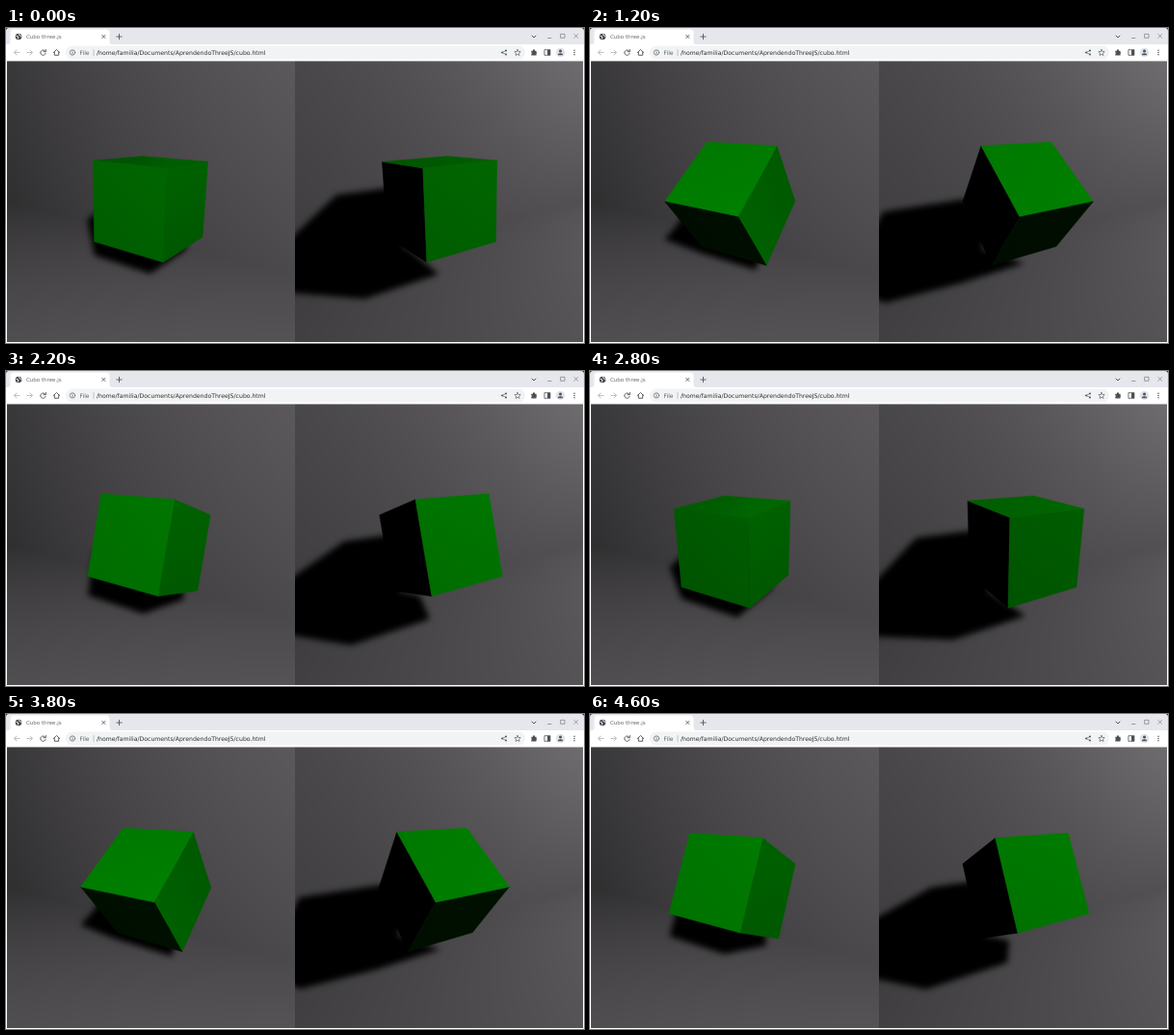
Write an HTML page with a canvas that moves like this. It is 600 px wide and 328 px high and loops after 4700 ms.

```html
<!DOCTYPE html>
<html lang="pt">
<head>
<meta charset="utf-8">
<title>Cubo three.js</title>
<style>
  html, body { margin: 0; width: 600px; height: 328px; overflow: hidden; background: #fff; }
  canvas, svg { position: absolute; left: 0; top: 0; display: block; }
  text { font-family: "DejaVu Sans", sans-serif; }
</style>
</head>
<body>
<canvas id="stage" width="600" height="328"></canvas>
<svg width="600" height="328" viewBox="0 0 600 328" fill="none" stroke-linecap="round" stroke-linejoin="round">
  <path d="M0 0H600V17H0Z" fill="#e6e7ed"/>
  <path d="M0 0H3Q0 0 0 3ZM600 0H597Q600 0 600 3Z" fill="#222"/>
  <path d="M0 17H2Q4.500 17 4.500 14V5Q4.500 1.500 8 1.500H104Q107.500 1.500 107.500 5V14Q107.500 17 110 17H600V34.500H0Z" fill="#fff"/>
  <circle cx="13" cy="9" r="3.300" fill="#4b4f54"/>
  <path d="M10.800 8.200L12.600 9L12.300 11M13.500 6.500L14.500 8L15.500 8.300" stroke="#fff" stroke-width=".9"/>
  <text x="21" y="11.200" font-size="5.500" fill="#686c70">Cubo three.js</text>
  <path d="M99.800 7.300L103 10.500M103 7.300L99.800 10.500M114.800 9H120.200M117.500 6.300V11.700" stroke="#44474b" stroke-width=".8"/>
  <path d="M546 8L548 10L550 8" stroke="#44474b" stroke-width=".9"/>
  <path d="M562.500 10.500H566M576 6.300H580V10.300H576ZM589.800 6.500L593.600 10.300M593.600 6.500L589.800 10.300" stroke="#85888c" stroke-width=".8"/>
  <path d="M14 25.500H8.500M11 23L8.500 25.500L11 28M22 25.500H27.500M25 23L27.500 25.500L25 28" stroke="#b6b8bb" stroke-width=".9"/>
  <g stroke="#4d5156" stroke-width=".9">
    <path d="M40.800 24.200A2.700 2.700 0 1 0 41.100 26.500M41.300 22.500V24.700H39"/>
    <path d="M49.300 25.500L52.500 22.500L55.700 25.500M50.300 25V28.300H54.700V25"/>
  </g>
  <rect x="62" y="18.500" width="477" height="14" rx="7" fill="#f1f3f4"/>
  <circle cx="69" cy="25.500" r="2.700" stroke="#5f6368" stroke-width=".7"/>
  <path d="M69 25.300V27M69 24V24.100" stroke="#5f6368" stroke-width=".7"/>
  <text x="76.500" y="27.600" font-size="6" fill="#5f6368">File</text>
  <path d="M91 22.500V28.500" stroke="#a2a5a9" stroke-width=".6"/>
  <text x="94" y="27.600" font-size="6.170" fill="#2c2e31">/home/familia/Documents/AprendendoThreeJS/cubo.html</text>
  <g stroke="#5f6368" stroke-width=".7">
    <path d="M519 23.500L515 25.500L519 27.500"/>
    <path d="M531 22.400L531.900 24.500L534.200 24.700L532.500 26.200L533 28.500L531 27.300L529 28.500L529.500 26.200L527.800 24.700L530.100 24.500Z"/>
  </g>
  <g fill="#4d5156">
    <circle cx="519" cy="23.500" r=".9"/><circle cx="515" cy="25.500" r=".9"/><circle cx="519" cy="27.500" r=".9"/>
    <path d="M545.300 23.700H547V22.800Q548 21.500 549 22.800V23.700H550.500V25.200Q552 26 550.500 27V28.500H545.300V27Q546.600 26 545.300 25.200Z"/>
    <path d="M562 22.700H565V28.300H562Z"/>
    <circle cx="590" cy="23.200" r=".75"/><circle cx="590" cy="25.500" r=".75"/><circle cx="590" cy="27.800" r=".75"/>
  </g>
  <rect x="559.300" y="22.700" width="5.600" height="5.600" stroke="#4d5156" stroke-width=".8"/>
  <circle cx="575.500" cy="25.500" r="4.700" fill="#dfe3ea"/>
  <circle cx="575.500" cy="24.100" r="1.500" fill="#4d5156"/>
  <path d="M572.600 28.300Q572.800 26.300 575.500 26.300T578.400 28.300Z" fill="#4d5156"/>
</svg>
<script>
const LOOP = 4700, STEP = 100;
const FOCAL = 312, MID_Y = 180.5;
const LEFT = 1, RIGHT = 599, TOP = 34, BOTTOM = 327;
const CAMERA = [4, 2, 6], LIGHT = [10, 10, 10];
const FLOOR = -2, WALL = -2;
const START = -3, DEG_PER_SEC = 34.4;
const SHADOW_SCALE = 0.92, SHADOW_BLUR = 3;

const dot = (a, b) => a[0] * b[0] + a[1] * b[1] + a[2] * b[2];
const sub = (a, b) => a.map((v, i) => v - b[i]);
const unit = a => a.map(v => v / Math.hypot(...a));
const cross = (a, b) => [a[1] * b[2] - a[2] * b[1], a[2] * b[0] - a[0] * b[2], a[0] * b[1] - a[1] * b[0]];
const lambert = (p, n) => Math.max(0, dot(n, unit(sub(LIGHT, p))));

const back = unit(CAMERA), right = unit(cross([0, 1, 0], back)), up = cross(back, right);
const DIST = Math.hypot(...CAMERA);

// side is 1 for the left view and -1 for the mirrored camera on the right
const mirror = (p, side) => [p[0] * side, p[1], p[2]];

function project(p, side) {
  const q = mirror(p, side), k = FOCAL / (DIST - dot(q, back));
  return [300 - side * (149 - k * dot(q, right)), MID_Y - k * dot(q, up)];
}

const ctx = document.getElementById("stage").getContext("2d");

function makeCanvas() {
  const c = document.createElement("canvas");
  c.width = 600;
  c.height = 328;
  return c;
}
const room = makeCanvas(), shade = makeCanvas();

function paintRoom() {
  const g = room.getContext("2d"), img = g.createImageData(600, 328);
  for (let y = TOP; y < BOTTOM; y++) {
    for (let x = LEFT; x < RIGHT; x++) {
      const side = x < 300 ? 1 : -1;
      const sx = (149 - side * (300 - x - 0.5)) / FOCAL, sy = (MID_Y - y - 0.5) / FOCAL;
      const eye = mirror(CAMERA, side);
      const ray = mirror(right.map((r, i) => r * sx + up[i] * sy - back[i]), side);
      const toWall = ray[2] < 0 ? (WALL - eye[2]) / ray[2] : Infinity;
      const toFloor = ray[1] < 0 ? (FLOOR - eye[1]) / ray[1] : Infinity;
      const t = Math.min(toWall, toFloor);
      const hit = eye.map((v, i) => v + ray[i] * t);
      const v = 126 * lambert(hit, toWall < toFloor ? [0, 0, 1] : [0, 1, 0]) ** 1.25;
      img.data.set([v, v * 0.975, v * 1.005, 255], (y * 600 + x) * 4);
    }
  }
  g.putImageData(img, 0, 0);
}

function trace(g, points) {
  g.beginPath();
  points.forEach(([x, y]) => g.lineTo(x, y));
  g.closePath();
}

function cubeFaces(angle) {
  const c = Math.cos(angle), s = Math.sin(angle);
  const turn = ([x, y, z]) => [x, y * c - z * s, y * s + z * c];
  const faces = [];
  for (let axis = 0; axis < 3; axis++) {
    for (const sign of [-1, 1]) {
      const corner = (a, b) => {
        const p = [0, 0, 0];
        p[axis] = sign;
        p[(axis + 1) % 3] = a;
        p[(axis + 2) % 3] = b;
        return turn(p);
      };
      const n = [0, 0, 0];
      n[axis] = sign;
      faces.push({ normal: turn(n), points: [corner(-1, -1), corner(1, -1), corner(1, 1), corner(-1, 1)] });
    }
  }
  return faces;
}

// Casts a point of the slightly shrunken cube away from the light onto a plane
function cast(point, axis, level) {
  const p = point.map(v => v * SHADOW_SCALE);
  const k = (p[axis] - level) / (LIGHT[axis] - p[axis]);
  return p.map((v, i) => v + (v - LIGHT[i]) * k);
}

function drawShadow(faces, side) {
  const g = shade.getContext("2d");
  g.clearRect(0, 0, 600, 328);
  const a = project([-12 * side, FLOOR, WALL], side), b = project([5 * side, FLOOR, WALL], side);
  for (const [axis, level, edge, overlap] of [[2, WALL, -100, 0.7], [1, FLOOR, 428, -0.7]]) {
    g.save();
    trace(g, [[a[0], a[1] + overlap], [b[0], b[1] + overlap], [b[0], edge], [a[0], edge]]);
    g.clip();
    for (const f of faces) {
      trace(g, f.points.map(p => project(cast(p, axis, level), side)));
      g.fill();
    }
    g.restore();
  }
  ctx.filter = `blur(${SHADOW_BLUR}px)`;
  ctx.drawImage(shade, 0, 0);
  ctx.filter = "none";
}

function drawCube(faces, side) {
  const eye = mirror(CAMERA, side);
  for (const { normal, points } of faces) {
    if (dot(normal, eye) <= 1) continue;
    const flat = points.map(p => project(p, side));
    const light = points.map(p => lambert(p, normal));
    const lo = light.indexOf(Math.min(...light)), hi = light.indexOf(Math.max(...light));
    const green = i => `rgb(0,${Math.round(148 * light[i] ** 0.75)},0)`;
    let paint = green(lo);
    if (lo !== hi) {
      paint = ctx.createLinearGradient(...flat[lo], ...flat[hi]);
      paint.addColorStop(0, green(lo));
      paint.addColorStop(1, green(hi));
    }
    ctx.fillStyle = ctx.strokeStyle = paint;
    ctx.lineWidth = 0.5;
    trace(ctx, flat);
    ctx.fill();
    ctx.stroke();
  }
}

function draw(ms) {
  const faces = cubeFaces((START + DEG_PER_SEC * ms / 1000) * Math.PI / 180);
  ctx.clearRect(0, 0, 600, 328);
  ctx.drawImage(room, 0, 0);
  for (const side of [1, -1]) {
    ctx.save();
    ctx.beginPath();
    ctx.rect(side > 0 ? LEFT : 300, TOP, 299, BOTTOM - TOP);
    ctx.clip();
    drawShadow(faces, side);
    drawCube(faces, side);
    ctx.restore();
  }
}

paintRoom();
const begin = performance.now();
let shown = -1;
function tick() {
  const ms = Math.floor((performance.now() - begin) % LOOP / STEP) * STEP;
  if (ms !== shown) draw(shown = ms);
  requestAnimationFrame(tick);
}
tick();
</script>
</body>
</html>
```
